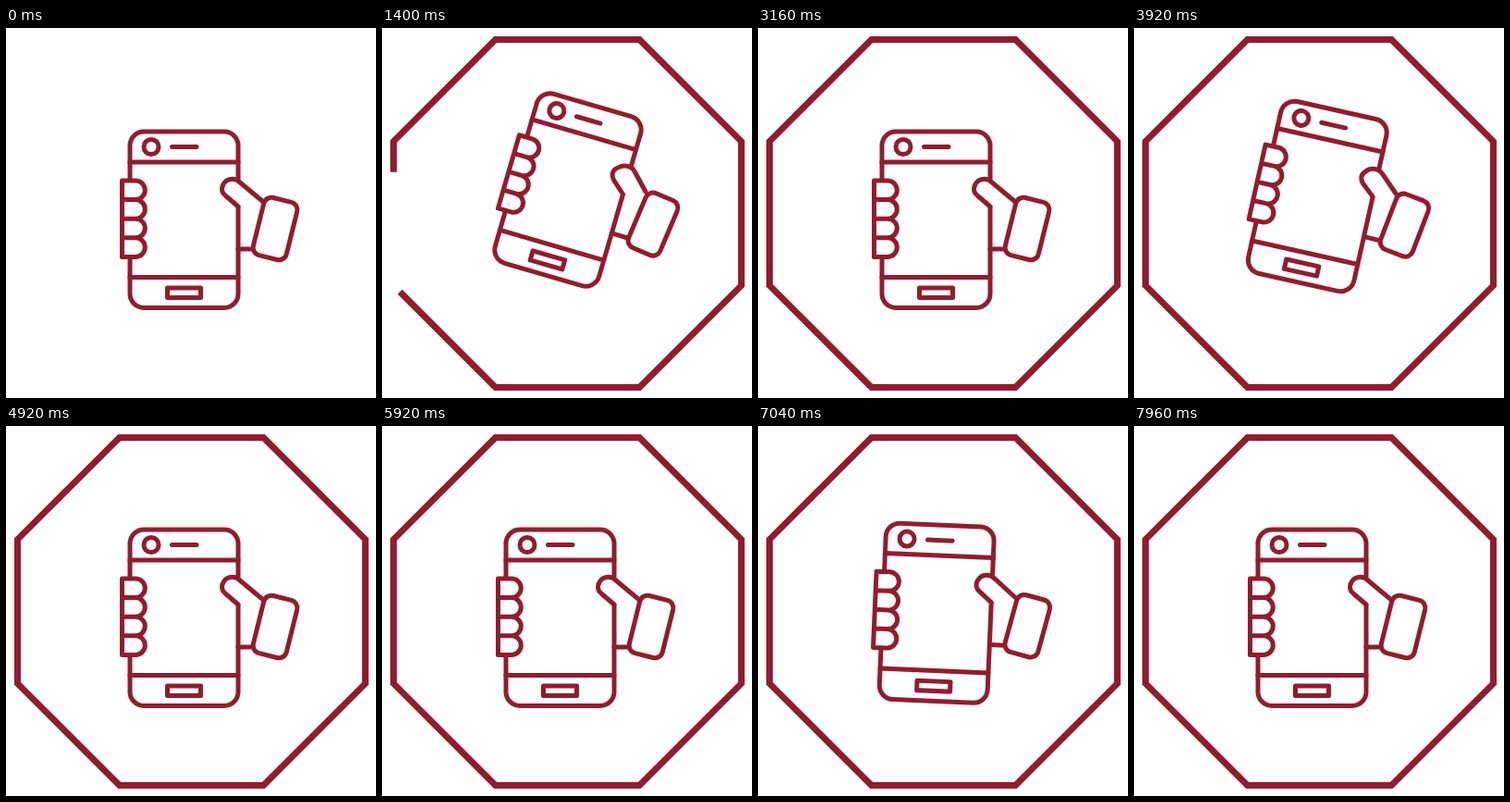
An HTML page that plays this animation: 400x400 px, repeating every 8000 ms.

```html
<!DOCTYPE html>
<html lang="en">
<head>
<meta charset="utf-8">
<title>Phone in hand</title>
<style>
  html, body { margin: 0; width: 100%; height: 100%; overflow: hidden; background: #fff; }
  svg { display: block; width: 100vw; height: 100vh; }
  .ink { fill: none; stroke: #931b31; stroke-width: 5; stroke-linecap: round; stroke-linejoin: round; }
  .solid { fill: #fff; }
  #frame { stroke-width: 7; stroke-linecap: butt; stroke-linejoin: miter; }
</style>
</head>
<body>
<svg viewBox="0 0 400 400">
  <path id="frame" class="ink" pathLength="11"/>
  <g class="ink">
    <g id="phone">
      <rect x="134" y="112" width="117" height="190.5" rx="15"/>
      <path d="M134 145H251M134 269.5H251M179.5 128.5H206"/>
      <circle cx="157" cy="128.5" r="8"/>
      <rect x="174.5" y="281" width="36" height="10.5"/>
      <path id="fingers" class="solid"/>
    </g>
    <path id="palm"/>
    <path id="thumb" class="solid"/>
    <g id="cuff">
      <rect class="solid" x="-18.5" y="-32" width="37" height="64" rx="8.5"
            transform="translate(291 217) rotate(14)"/>
    </g>
  </g>
</svg>
<script>
  const LOOP = 8000;
  const TILT = 16.2;
  const ROCK_STARTS = [880, 3560, 5960];
  // [ms after the rock starts, phone angle]
  const ROCK = [[0, 0], [520, TILT], [680, TILT], [1240, -0.9], [1360, 0]];
  const THUMB_REST = [277,187, 253,167, 247,161, 238,163, 235,169, 232,174, 234,179, 237,181, 251,193];
  const THUMB_TILT = [285,177, 273,155, 270,149, 261,147, 255,151, 248,154, 248,160, 251,165, 260,179];
  const PALM_REST = [251,239, 268,239];
  const PALM_TILT = [248.3,221.8, 267,227.5];

  const el = id => document.getElementById(id);
  const [frame, phone, fingers, palm, thumb, cuff] =
    ['frame', 'phone', 'fingers', 'palm', 'thumb', 'cuff'].map(el);

  const ease = x => {
    const s = Math.min(1, Math.max(0, x));
    return s * s * (3 - 2 * s);
  };
  const blend = (a, b, k) => a.map((v, i) => v + (b[i] - v) * k);

  // Octagon sides run past a full turn so the line can start anywhere on it.
  const corners = Array.from({ length: 12 }, (_, i) => {
    const a = (112.5 + 45 * i) * Math.PI / 180;
    return [200.5 + 203.5 * Math.cos(a), 200.5 + 203.5 * Math.sin(a)];
  });
  frame.setAttribute('d', 'M' + corners.join('L'));

  fingers.setAttribute('d', [0, 1, 2, 3].map(i =>
    `M125.5 ${165 + 20.6 * i}H140a10.3 10.3 0 0 1 0 20.6H125.5z`).join(''));

  function phoneAngle(t) {
    const start = ROCK_STARTS.findLast(s => s <= t);
    if (start === undefined) return 0;
    const next = ROCK.findIndex(([at]) => at > t - start);
    if (next < 0) return 0;
    const [t0, a0] = ROCK[next - 1], [t1, a1] = ROCK[next];
    return a0 + (a1 - a0) * ease((t - start - t0) / (t1 - t0));
  }

  function draw(t) {
    const drawn = ease((t - 380) / 1280);
    const length = drawn < 1 ? 8 * drawn : 8.5;
    frame.style.visibility = drawn > 0 ? 'visible' : 'hidden';
    frame.setAttribute('stroke-dasharray', `0 ${2 * drawn} ${length} 99`);

    const angle = phoneAngle(t);
    const k = Math.max(0, angle / TILT);
    phone.setAttribute('transform', `rotate(${angle} 310 221)`);
    cuff.setAttribute('transform', `rotate(${9 * k} 323 227)`);
    const p = blend(THUMB_REST, THUMB_TILT, k);
    thumb.setAttribute('d',
      `M${p.slice(0, 2)}L${p.slice(2, 4)}C${p.slice(4, 16)}L${p.slice(16)}`.replace(
        /C.*L/, `C${p.slice(4, 10)}C${p.slice(10, 16)}L`));
    palm.setAttribute('d', 'M' + blend(PALM_REST, PALM_TILT, k));
  }

  const origin = performance.now();
  function tick() {
    draw((performance.now() - origin) % LOOP);
    requestAnimationFrame(tick);
  }
  draw(0);
  requestAnimationFrame(tick);
</script>
</body>
</html>
```
